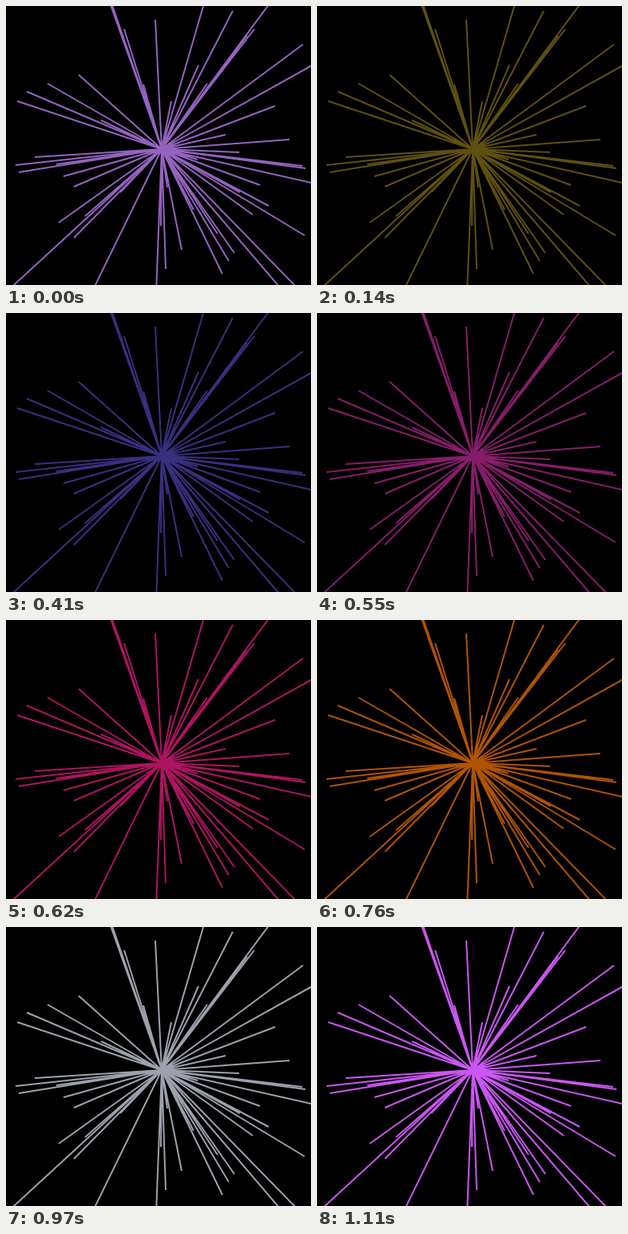
An HTML page that plays this animation: 382 by 349 pixels, repeating every 1180 ms.

```html
<!DOCTYPE html>
<html lang="en">
<head>
<meta charset="utf-8">
<title>Flashing rays</title>
<style>
  html, body { margin: 0; width: 100%; height: 100%; overflow: hidden; background: #000; }
  svg { display: block; width: 382px; height: 349px; }
</style>
</head>
<body>
<svg viewBox="0 0 382 349"><path id="rays" fill="none" stroke-width="2"/></svg>
<script>
const LOOP = 1180, STEP = 70;
const rays = document.getElementById('rays');

// Outer ends of the rays, clockwise from the top.
const tips = [
  [187, 17], [207, 119], [250, -10], [241, 74], [284, 6], [252, 97], [336, -11],
  [302, 37], [311, 29], [372, 48], [400, 65], [337, 125], [275, 161], [355, 167],
  [292, 183], [371, 200], [375, 203], [400, 225], [240, 192], [318, 224],
  [329, 250], [293, 233], [309, 261], [374, 287], [371, 359], [349, 359],
  [286, 309], [279, 319], [265, 285], [271, 335], [235, 255], [220, 305],
  [202, 227], [200, 329], [194, 275], [188, 359], [107, 359], [85, 290],
  [143, 233], [-1, 359], [99, 263], [66, 271], [85, 226], [72, 213],
  [63, 198], [16, 208], [12, 199], [36, 189], [14, 119], [26, 107],
  [119, 143], [52, 97], [91, 86], [128, -10], [130, -10], [148, 29], [172, 98]
];
rays.setAttribute('d', tips.map(([x, y]) => `M195 179L${x} ${y}`).join(''));

// Key colours by step; steps between them take a blend.
const keys = [
  [0, '#9463c0'], [2, '#5e5010'], [6, '#392f7f'], [9, '#ad145f'],
  [11, '#b05304'], [13, '#86c68a'], [16, '#cb56f3']
];
const channels = hex => [1, 3, 5].map(i => parseInt(hex.slice(i, i + 2), 16));

function colourAt(step) {
  const next = Math.max(1, keys.findIndex(([at]) => at >= step));
  const [from, a] = keys[next - 1], [to, b] = keys[next];
  const mix = (step - from) / (to - from), end = channels(b);
  return `rgb(${channels(a).map((v, i) => Math.round(v + (end[i] - v) * mix))})`;
}

// The sixth step is 10 ms shorter than the others.
function stepAt(t) {
  return t < 410 ? Math.floor(t / STEP) : 6 + Math.floor((t - 410) / STEP);
}

function draw(now) {
  rays.setAttribute('stroke', colourAt(stepAt(now % LOOP)));
}

const start = performance.now();
function tick() {
  draw(performance.now() - start);
  requestAnimationFrame(tick);
}
tick();
</script>
</body>
</html>
```
